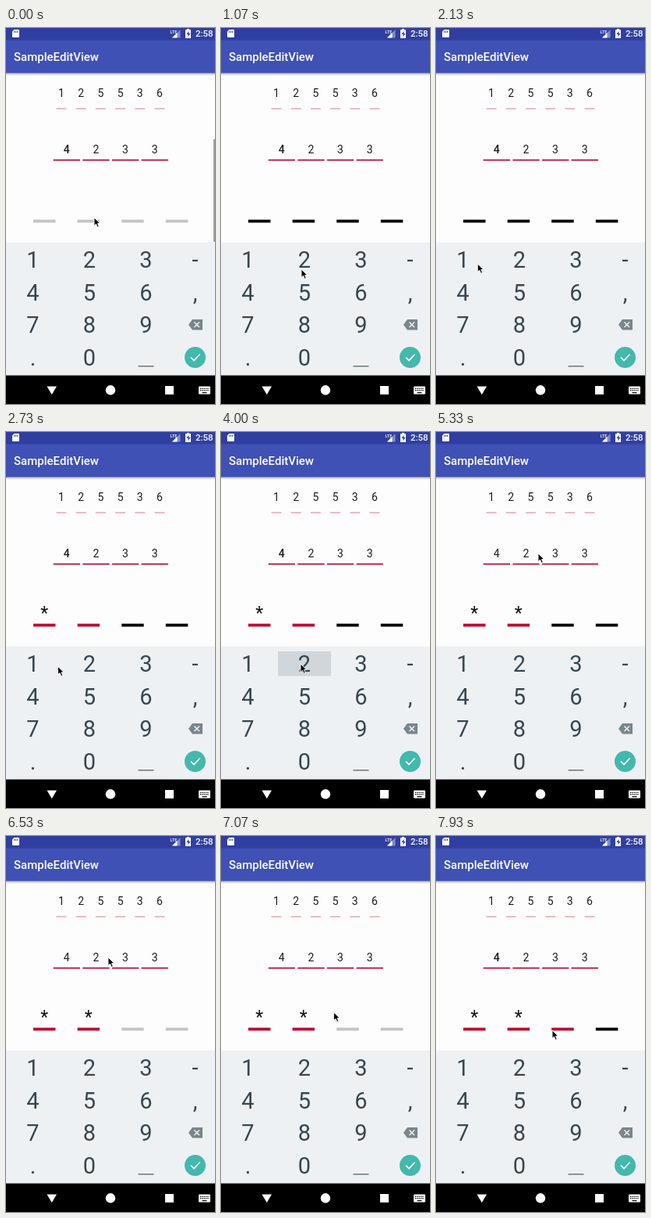
An HTML page that plays this animation: 268x480 px, repeating every 8 s.

```html
<!DOCTYPE html>
<html lang="en">
<head>
<meta charset="utf-8">
<title>SampleEditView</title>
<style>
  html, body { margin: 0; width: 100%; height: 100%; overflow: hidden; background: #fdfdfd; }
  svg { display: block; width: 268px; height: 480px; font-family: Roboto, sans-serif; }
  .mid { text-anchor: middle; }
  .digit { font-size: 14px; fill: #1c1c1c; }
  .star { font-size: 23px; fill: #111; }
  .key { font-size: 29px; fill: #37474f; }
  .white { fill: #fff; }
</style>
</head>
<body>
<svg id="stage" viewBox="0 0 268 480">
  <defs>
    <linearGradient id="shade" x2="0" y2="1">
      <stop offset="0" stop-color="#000" stop-opacity=".3"/>
      <stop offset="1" stop-color="#000" stop-opacity="0"/>
    </linearGradient>
  </defs>
  <rect width="268" height="480" fill="#fdfdfd"/>
  <rect y="57" width="268" height="4" fill="url(#shade)"/>
  <rect y="15" width="268" height="42.5" fill="#3f51b5"/>
  <rect width="268" height="15.5" fill="#303f9f"/>

  <g class="white">
    <path d="M10.5 2H16q1 0 1 1v8q0 1-1 1H9q-1 0-1-1V4.5z"/>
    <path d="M10.5 4v2M12.5 4v2M14.5 4v2" stroke="#303f9f" stroke-width="1"/>
    <text x="210.5" y="6.5" font-size="5.5" font-weight="500">LTE</text>
    <path d="M223.5 2v10.5H213z" opacity=".4"/>
    <path d="M219.5 6v6.5H213z"/>
    <path d="M232 1h3v1.3h2V13h-7V2.300h2z"/>
    <path d="M234.500 4l-3 4h2v3.200l3-4.200h-2z" fill="#303f9f"/>
    <text x="243" y="11" font-size="11.500" font-weight="500">2:58</text>
    <text x="10" y="42" font-size="15" font-weight="500">SampleEditView</text>
  </g>

  <g id="fields"></g>
  <rect id="scroll" x="266" y="142" width="2" height="131" fill="#a0a0a0"/>

  <rect y="273.500" width="268" height="170.500" fill="#eef1f4"/>
  <rect id="press" y="280" width="68" height="31.500" fill="#d0d6da"/>
  <g id="keys"></g>
  <rect x="169.500" y="431" width="20" height="1.500" fill="#6b7880"/>
  <path d="M239 372h13v13.500h-13l-5-6.750z" fill="#78868d"/>
  <path d="M241.500 375.500l6.500 6.500M248 375.500l-6.500 6.500" stroke="#eef1f4" stroke-width="1.500"/>
  <circle cx="242.500" cy="420.500" r="13.500" fill="#43b8ad"/>
  <path d="M237 420.500l4 4 7.500-8" fill="none" stroke="#fff" stroke-width="1.700"/>

  <rect y="443.500" width="268" height="36.500"/>
  <g class="white">
    <path d="M52.500 457.500h12.500l-6.250 10.500z"/>
    <circle cx="134" cy="462.300" r="6.200"/>
    <rect x="204" y="457" width="11" height="10.800"/>
    <rect x="247" y="457.500" width="15" height="10" rx="1"/>
  </g>
  <path d="M249 460.300h11M249 462.700h11" stroke="#000" stroke-width="1.200" stroke-dasharray="1.300 1"/>
  <path d="M251.500 465.500h6" stroke="#000" stroke-width="1.200"/>

  <path id="pointer" d="M0 0V10.300L2.500 8.200L4.300 12.300L6.200 11.500L4.500 7.500H7.700Z"
        fill="#000" stroke="#fff" stroke-width=".9"/>
</svg>
<script>
const LOOP = 8000;
const RED = '#be0c34', BLACK = '#000', GREY = '#c4c4c4';
const $ = id => document.getElementById(id);

function add(parent, tag, attrs, text = '') {
  const el = document.createElementNS('http://www.w3.org/2000/svg', tag);
  for (const name in attrs) el.setAttribute(name, attrs[name]);
  el.textContent = text;
  return parent.appendChild(el);
}

const fields = $('fields');
const label = (x, y, cls, text) => add(fields, 'text', { x, y, class: 'mid ' + cls }, text);
const bar = (x, y, width, height, fill) => add(fields, 'rect', { x, y, width, height, fill });

[...'125536'].forEach((d, i) => {
  const x = 71 + i * 25.2;
  label(x, 88, 'digit', d);
  bar(x - 6.5, 102.5, 13, 1, '#de7a8a');
});
const pin = [...'4233'].map((d, i) => {
  const x = 77.7 + i * 37.65;
  bar(x - 17, 167.7, 34.3, 1.8, '#bc1434');
  return label(x, 160, 'digit', d);
});
const slots = [0, 1, 2, 3].map(i => bar(35 + i * 56.6, 244.7, 28.5, 3.8, GREY));
const stars = [0, 1].map(i => label(49.2 + i * 56.6, 239, 'star', '*'));

['123-', '456,', '789', '.0'].forEach((row, r) => [...row].forEach((k, c) =>
  add($('keys'), 'text', { x: [34.5, 107, 179.5, 242.5][c], y: 306.3 + r * 41.4, class: 'mid key' }, k)));

// time, x, y
const path = [
  [0, 113, 242], [270, 113, 242], [800, 103, 308], [1650, 103, 308], [2270, 46, 300],
  [2600, 46, 300], [2930, 105, 298], [3530, 105, 298], [3800, 102, 296],
  [4600, 102, 296], [5300, 131, 155], [6530, 131, 155], [7330, 149, 248], [LOOP, 149, 248]
];
// time down, time up, key left edge
const presses = [[2470, 2590, 0.5], [4000, 4130, 73]];

function pointerAt(t) {
  const i = path.findIndex(p => p[0] > t);
  const [t0, x0, y0] = path[i - 1], [t1, x1, y1] = path[i];
  const u = (t - t0) / (t1 - t0), e = u * u * (3 - 2 * u);
  return [x0 + (x1 - x0) * e, y0 + (y1 - y0) * e];
}

function draw(t) {
  $('pointer').setAttribute('transform', `translate(${pointerAt(t)})`);
  $('scroll').setAttribute('opacity', Math.max(0, Math.min(1, (450 - t) / 330)));

  const press = presses.find(([a, b]) => t >= a && t < b);
  $('press').style.display = press ? '' : 'none';
  if (press) $('press').setAttribute('x', press[2]);

  const typed = presses.filter(p => t >= p[1]).length;
  const focused = (t >= 200 && t < 5800) || t >= 7730;
  const lit = Math.floor((t - 60) / 504) % 2 === 1;
  slots.forEach((s, i) => s.setAttribute('fill',
    i < typed || (focused && lit && i === typed) ? RED : focused ? BLACK : GREY));
  stars.forEach((s, i) => s.style.display = i < typed ? '' : 'none');
  pin[0].setAttribute('font-weight', t < 4070 || t >= 7670 ? 500 : 400);
}

function tick() {
  draw(performance.now() % LOOP);
  requestAnimationFrame(tick);
}
tick();
</script>
</body>
</html>
```
